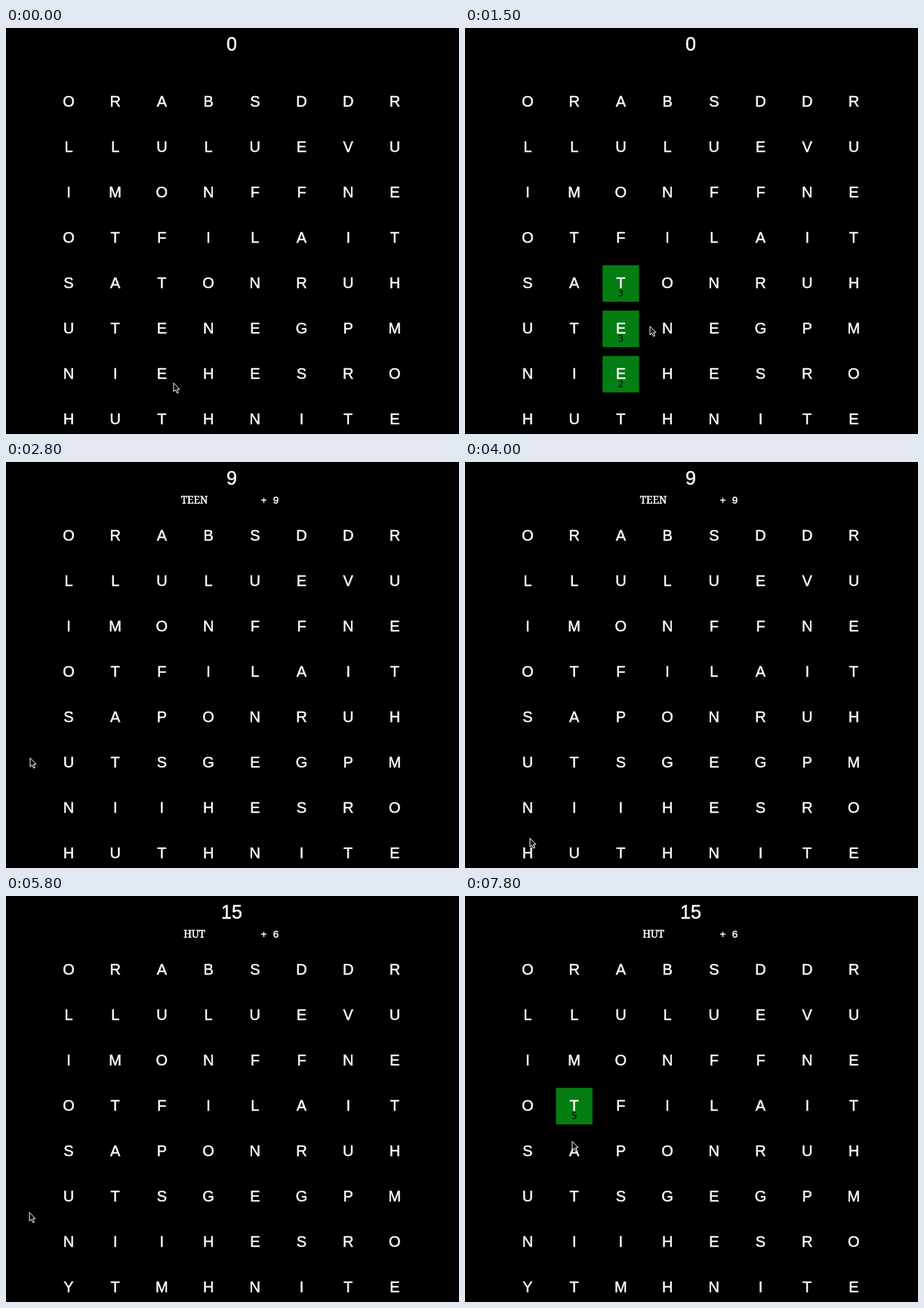
An HTML page with a canvas for the animation above (8000 ms loop, 600 by 537 pixels).

```html
<!DOCTYPE html>
<html lang="en">
<head>
<meta charset="utf-8">
<title>Word grid</title>
<style>
  html, body { margin: 0; height: 100%; overflow: hidden; background: #000; }
  canvas { display: block; }
</style>
</head>
<body>
<canvas width="600" height="537"></canvas>
<script>
const ctx = document.querySelector('canvas').getContext('2d');
const LOOP = 8000, STEP = 100, TILE = 48.3, LEFT = 83, TOP = 97.3, COL = 61.7, ROW = 60;
const SANS = '"Liberation Sans", Arial, sans-serif';

const START = ['ORABSDDR', 'LLULUEVU', 'IMONFFNE', 'OTFILAIT',
               'SATONRUH', 'UTENEGPM', 'NIEHESRO', 'HUTHNITE'];

// A click picks the tile under the pointer; at the end of a turn picked tiles are refilled.
const turns = [
  { end: 2800, clicks: [500, 800, 1300, 1800], points: [3, 3, 2, 1], refill: 'PSIG' },
  { end: 5800, clicks: [4400, 4700, 5100], points: [3, 2, 1], refill: 'YTM' },
  { end: Infinity, clicks: [7600], points: [5] }
];

// Pointer moves: start time, end time, x, y
const HOME = [221.5, 469];
const moves = [
  [0, 200, 233, 430], [200, 500, 212, 345], [600, 800, 207, 397],
  [800, 1100, 198, 451], [1200, 1500, 245, 394],
  [1800, 2100, 190, 358], [2100, 2500, 32, 391],
  [3400, 4000, 86, 497], [4400, 4800, 168, 518], [4800, 5100, 210, 517],
  [5200, 5700, 31, 418], [6300, 6600, 161, 319],
  [6800, 7200, 149, 290], [7500, 7800, 142, 324]
];
const arrow = new Path2D('M0 0V11.5L2.6 9L4.5 13.4L6.4 12.6L4.6 8.3H8Z');

const colX = col => LEFT + col * COL;
const rowY = row => TOP + row * ROW;
const ease = k => (1 - Math.cos(Math.PI * k)) / 2;

function pointerAt(t) {
  let [x, y] = HOME;
  for (const [start, end, toX, toY] of moves) {
    if (t < start) break;
    const k = ease(Math.min(1, (t - start) / (end - start)));
    x += (toX - x) * k;
    y += (toY - y) * k;
  }
  return [x, y];
}

function stateAt(t) {
  const letters = START.map(row => [...row]);
  const state = { letters, picked: [], score: 0, word: '', gain: 0 };
  for (const { end, clicks, points, refill } of turns) {
    const picked = clicks.filter(time => time <= t).map((time, i) => {
      const [x, y] = pointerAt(time);
      return { row: Math.round((y - TOP) / ROW), col: Math.round((x - LEFT) / COL), points: points[i] };
    });
    if (t < end) {
      state.picked = picked;
      break;
    }
    state.word = picked.map(p => letters[p.row][p.col]).join('');
    state.gain = picked.reduce((sum, p) => sum + p.points, 0);
    state.score += state.gain;
    picked.forEach((p, i) => letters[p.row][p.col] = refill[i]);
  }
  return state;
}

function write(text, x, y, font, color = '#fff', weight = 0.45) {
  ctx.font = font;
  ctx.fillStyle = ctx.strokeStyle = color;
  ctx.lineWidth = weight;
  ctx.fillText(text, x, y);
  ctx.strokeText(text, x, y);
}

function drawPointer(t) {
  const [x, y] = pointerAt(t);
  ctx.save();
  ctx.translate(Math.round(x), Math.round(y) + 0.5);
  ctx.fillStyle = '#000';
  ctx.strokeStyle = '#fff';
  ctx.lineWidth = 1;
  ctx.fill(arrow);
  ctx.stroke(arrow);
  ctx.restore();
}

function draw(t) {
  const { letters, picked, score, word, gain } = stateAt(t);
  ctx.fillStyle = '#000';
  ctx.fillRect(0, 0, 600, 537);
  ctx.textAlign = 'center';

  ctx.fillStyle = '#047d13';
  for (const { row, col } of picked)
    ctx.fillRect(colX(col) - TILE / 2, rowY(row) + 0.6 - TILE / 2, TILE, TILE);
  letters.forEach((line, row) => line.forEach((letter, col) =>
    write(letter, colX(col), rowY(row) + 6.7, '20px ' + SANS)));
  for (const { row, col, points } of picked)
    write(points, colX(col), rowY(row) + 17.7, '12px "DejaVu Sans", sans-serif', '#001a00', 0.1);

  write(score, 299, 30, '25px ' + SANS);
  if (word) {
    write(word, 249.5, 55, '13.5px "Noto Serif", serif');
    write('+ ' + gain, 349.5, 54.5, '13.33px "Liberation Mono", monospace');
  }
  drawPointer(t);
}

function tick() {
  const t = performance.now() % LOOP;
  draw(Math.floor(t / STEP) * STEP);
  requestAnimationFrame(tick);
}
tick();
</script>
</body>
</html>
```
